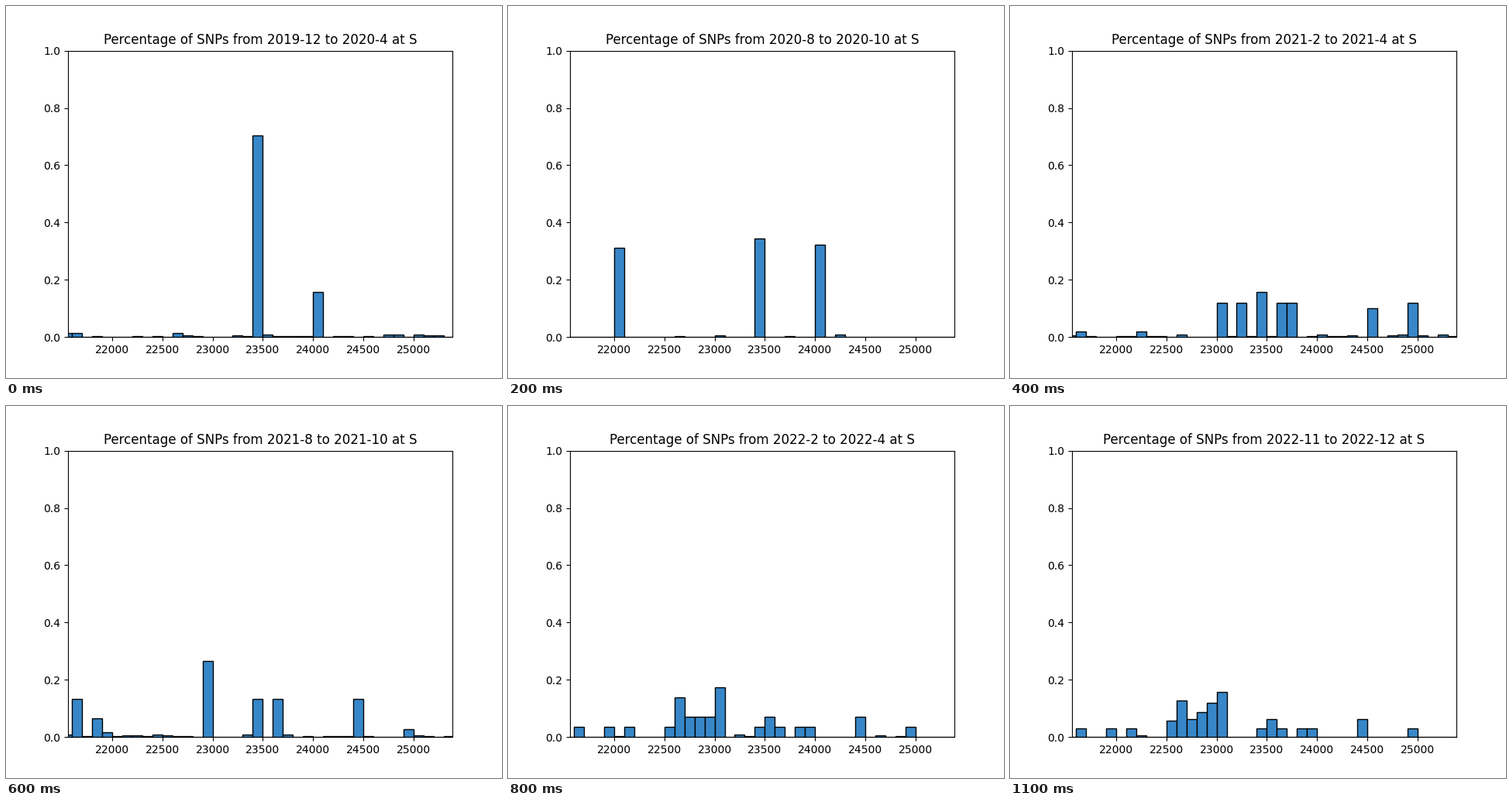
Animation of 640 by 480 pixels, one loop 1200 ms. Source, as a matplotlib script:

```python
import numpy as np
import matplotlib.pyplot as plt
from matplotlib.animation import FuncAnimation

FRAMES = 12
START, END, WIDTH = 21563, 25384, 100
EDGES = np.arange(21500, END, WIDTH)

rng = np.random.default_rng(4)


def wave(strays, mutations):
    """Share of SNPs per bin: a few mutations by weight plus tiny random strays."""
    shares = np.zeros(len(EDGES))
    for i, weight in mutations.items():
        shares[i] = weight
    spots = rng.choice(np.flatnonzero(shares == 0), strays, replace=False)
    sizes = np.resize([0.009, 0.003, 0.003, 0.006, 0.003], strays)
    shares *= (1 - sizes.sum()) / shares.sum()
    shares[spots] = sizes
    return shares


def ones(*bins):
    return dict.fromkeys(bins, 1)


# The last wave keeps every mutation and gains a few in the middle of the gene.
dense = ones(1, 4, 6, 10, 19, 21, 23, 24, 34) | {
    11: 4, 12: 2, 13: 2, 14: 2, 15: 5, 20: 2, 29: 2}

# Each wave peaks at its own time; in between, neighbours blend.
WAVES = {
    0: wave(20, {19: 1, 25: 0.224, 0: 0.02, 1: 0.02, 11: 0.02}),
    2: wave(4, {5: 0.97, 19: 1.07, 25: 1}),
    4: wave(20, ones(15, 17, 21, 22, 34) | {19: 1.3, 30: 0.84, 1: 0.17, 7: 0.17}),
    6: wave(20, ones(1, 19, 21, 29) | {14: 2, 3: 0.5, 34: 0.2, 4: 0.13}),
    8: wave(5, dense),
    9.8: wave(1, dense | {14: 3}),
    11.3: wave(1, dense | {10: 2, 13: 3, 14: 4}),
}
PEAKS, SHARES = list(WAVES), np.array(list(WAVES.values()))


def heights(k):
    return [np.interp(k, PEAKS, column) for column in SHARES.T]


def label(month):
    return f"{month // 12}-{month % 12 + 1}"


def span(k):
    """Quarters from May 2020; the first period is longer, the last one shorter."""
    first = 2020 * 12 + 4 + 3 * (k - 1)
    last = min(first + 2, 2022 * 12 + 11)
    if k == 0:
        first = 2019 * 12 + 11
    return f"{label(first)} to {label(last)}"


# Fine horizontal hinting keeps the letter spacing close to linear.
plt.rcParams["text.hinting_factor"] = 32

fig, ax = plt.subplots(figsize=(6.4, 4.8), dpi=100)
bars = ax.bar(EDGES, heights(0), WIDTH, align="edge",
              color="#3787c8", edgecolor="black")
ax.set_xlim(START, END)
ax.set_ylim(0, 1)
title = ax.set_title("")


def draw(k):
    for bar, h in zip(bars, heights(k)):
        bar.set_height(h)
    title.set_text(f"Percentage of SNPs from {span(k)} at S")
    return [*bars, title]


anim = FuncAnimation(fig, draw, frames=FRAMES, init_func=lambda: draw(0),
                     interval=100, repeat=True, repeat_delay=0, blit=False)
plt.show()
```
